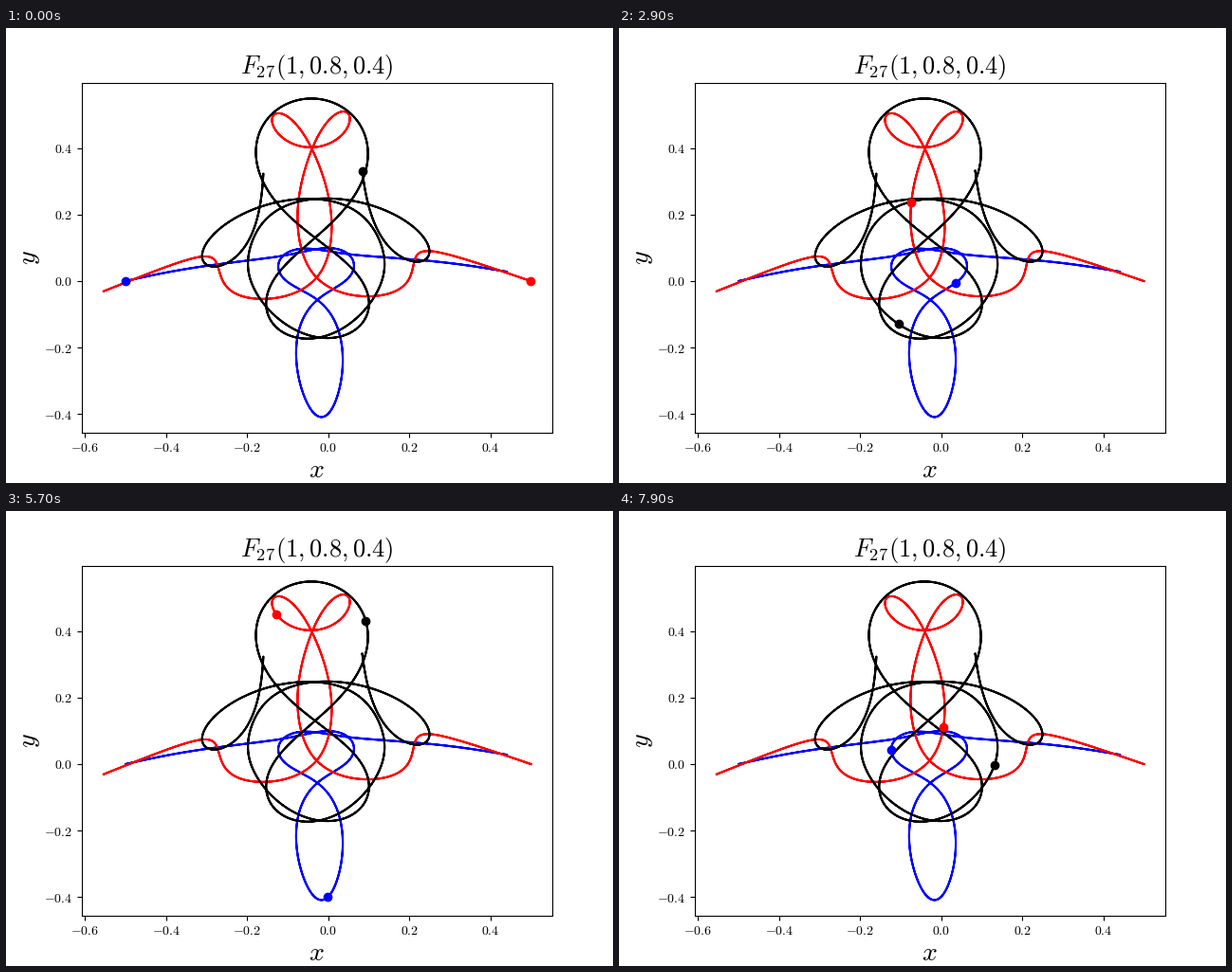
Write a matplotlib script that moves like this. It is 640x480 px and loops after 8 s.

```python
import numpy as np
import matplotlib.pyplot as plt
from matplotlib.animation import FuncAnimation

plt.rcParams["mathtext.fontset"] = "cm"

FRAMES, INTERVAL = 80, 100
SUB = 16                      # integration steps per frame while fitting
STEPS = 2400                  # integration steps of the whole fall
COLORS = ("b", "r", "k")
MASS = np.array([[1.0], [0.8], [0.4]])
NEXT, PREV = [1, 2, 0], [2, 0, 1]
MASS_NEXT = MASS[NEXT]

# Approximate positions of the three bodies at a few moments, and at the
# standstill at the far end; the free-fall orbit is fitted to them.
TIMES = np.array([0, 18, 29, 39, 57, 72, 79])
SEEN = np.array([
    [-.5, .5, .0854 + .3302j],
    [-.3038 + .0464j, .2053 + .018j, .1877 + .183j],
    [.0356 - .0048j, -.0737 + .2373j, -.1042 - .1282j],
    [-.069 - .299j, .0087 + .4895j, -.0007 + .102j],
    [-.0007 - .3989j, -.1271 + .4496j, .0953 + .4296j],
    [.0321 - .1687j, -.0428 + .404j, -.1505 - .0604j],
    [-.1224 + .0427j, .0059 + .1105j, .1327 - .0028j],
])
REST = np.array([.4429 + .0293j, -.5543 - .0305j, -.16 + .3240j])
BLUR = .002                   # uncertainty of these positions


def pull(z):
    """Gravity on each body, positions as complex numbers."""
    d = z[NEXT] - z
    r = np.abs(d)
    f = d / (r * r * r)
    return MASS_NEXT * f - (MASS * f)[PREV]


def fly(z, v, h, n):
    """Fourth-order Nystrom integration over n steps of size h."""
    path, speed = [z], [v]
    for _ in range(n):
        a = pull(z)
        b = pull(z + h * (v / 2 + h * a / 8))
        c = pull(z + h * (v + h * b / 2))
        z = z + h * (v + h * (a + 2 * b) / 6)
        v = v + h * (a + 4 * b + c) / 6
        path.append(z)
        speed.append(v)
    return np.array(path), np.array(speed)


def drop(x, y, h, n):
    """Release the bodies at rest, the third one at (x, y)."""
    z = np.array([x * 0 - .5 + 0j, x * 0 + .5 + 0j, x + 1j * y])
    return fly(z, z * 0, h, n)


def flatten(*parts):
    r = np.concatenate([p.reshape(-1, p.shape[-1]) for p in parts])
    return np.concatenate([r.real, r.imag])


def track_error(count):
    """Misfit of (x, y, frame time, lead in frames) at the first moments."""
    times = TIMES[:count]

    def error(p):
        x, y, dt, lead = p
        path, speed = drop(x, y, lead * dt / SUB, SUB)
        path, _ = fly(path[-1], speed[-1], dt / SUB, times[-1] * SUB)
        return flatten((path[times * SUB] - SEEN[:count, :, None]) / BLUR)
    return error


def rest_error(p):
    """Misfit of (x, y, duration): all bodies must come to rest."""
    x, y, span = p
    path, speed = drop(x, y, span / STEPS, STEPS)
    return flatten((path[-1] - REST[:, None]) / BLUR, speed[-1] / 1e-4)


def cost(error, p):
    c = (error(p) ** 2).sum(axis=0)
    return np.where(np.isfinite(c), c, np.inf)


def fit(error, p, rounds):
    """Levenberg-Marquardt, trying several dampings at once."""
    eps, k = 1e-7, len(p)
    for _ in range(rounds):
        r = error(p[:, None] + eps * np.eye(k, k + 1, 1))
        jac = (r[:, 1:] - r[:, :1]) / eps
        a, g = jac.T @ jac, jac.T @ r[:, 0]
        damp = np.diag(np.diag(a))
        tries = [p] + [p - np.linalg.solve(a + lam * damp, g)
                       for lam in np.logspace(-8, 3, 9)]
        tries = np.array(tries).T
        p = tries[:, np.argmin(cost(error, tries))]
    return p


def find_orbit():
    rng = np.random.default_rng(1)
    low, high = [.0824, .3272, .0225, 0], [.0884, .3332, .029, 0]
    p = rng.uniform(low, high, (1200, 4)).T
    p = p[:, np.argmin(cost(track_error(3), p))]
    for count in range(3, len(TIMES) + 1):
        p = fit(track_error(count), p, 5)
    x, y, dt, lead = p

    # The standstill is where the kinetic energy nearly vanishes.
    _, speed = drop(p[:1], p[1:2], dt / SUB, 128 * SUB)
    energy = (MASS * np.abs(speed) ** 2).sum(axis=1)[:, 0]
    late = TIMES[-1] * SUB
    stop = (late + np.argmin(energy[late:])) * dt / SUB
    x, y, span = fit(rest_error, np.array([x, y, stop]), 9)

    path, _ = drop(np.array([x]), np.array([y]), span / STEPS, STEPS)
    path = path[:, :, 0]
    clock = np.linspace(0, span, STEPS + 1)

    def place(t):
        return np.stack([np.interp(t, clock, z) for z in path.T], axis=1)

    def clock_error(q):
        return flatten((place(q[0] * TIMES[:, None] + q[1])
                        - SEEN[:, :, None]) / BLUR)

    dt, start = fit(clock_error, np.array([dt, lead * dt]), 6)
    return place(start + dt * np.arange(FRAMES)), path


with np.errstate(all="ignore"):
    stops, orbit = find_orbit()

fig, ax = plt.subplots(figsize=(6.4, 4.8), dpi=100)
# The bodies fall back along the same way, so each curve runs there and back.
for z, color in zip(np.concatenate([orbit, orbit[::-1]]).T, COLORS):
    ax.plot(z.real, z.imag, color=color, lw=1.5)
dots = [ax.plot([z.real], [z.imag], "o", color=color, zorder=3)[0]
        for z, color in zip(stops[0], COLORS)]

ax.set_xticks(np.arange(-3, 3) / 5)
ax.set_yticks(np.arange(-2, 3) / 5)
for axis in (ax.xaxis, ax.yaxis):
    axis.set_major_formatter("${x:.1f}$")
ax.tick_params(axis="x", pad=2.8)
ax.set_title("$F_{27}(1, 0.8, 0.4)$", fontsize=19, pad=7.2)
fig.text(327.5 / 640, 1 - 474 / 480, "$x$", fontsize=20, ha="center", va="baseline")
fig.text(31.2 / 640, 1 - 242.4 / 480, "$y$", fontsize=20, rotation=90,
         rotation_mode="anchor", ha="center", va="baseline")


def update(i):
    for dot, z in zip(dots, stops[i]):
        dot.set_data([z.real], [z.imag])
    return dots


anim = FuncAnimation(fig, update, frames=FRAMES, interval=INTERVAL,
                     repeat=True, repeat_delay=0)
plt.show()
```
